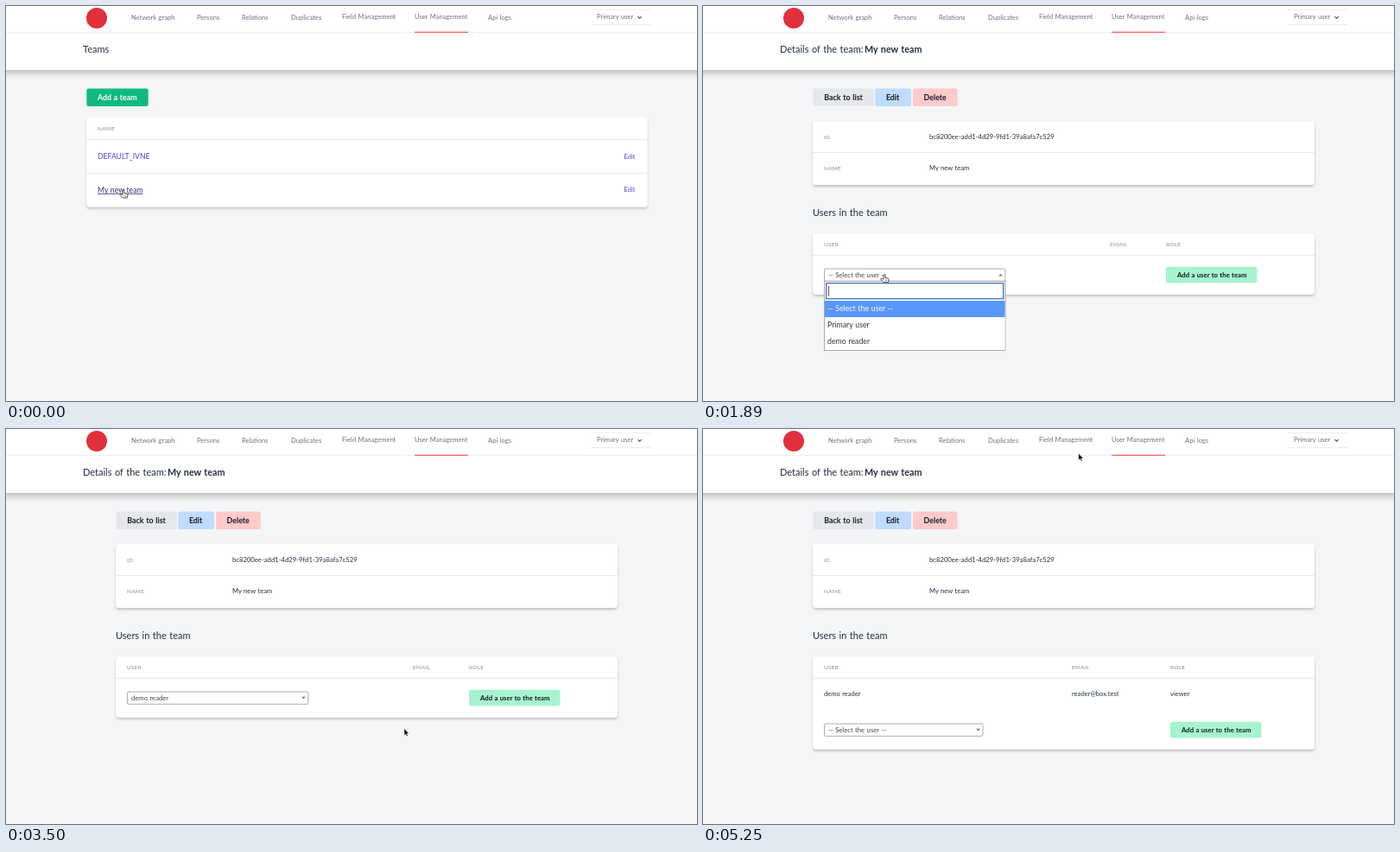
Write an HTML page that moves like this. It is 800x457 px and loops after 5320 ms.

```html
<!DOCTYPE html>
<html lang="en">
<head>
<meta charset="utf-8">
<title>Team management</title>
<style>
  html, body { margin: 0; width: 100%; height: 100%; overflow: hidden; background: #f4f5f7; }
  svg { display: block; width: 100vw; height: 100vh; }
  text { font-family: Lato, "Open Sans", sans-serif; word-spacing: .06em; fill: #252f3f; }
  .nav { font-size: 7.6px; fill: #6b7280; }
  .title { font-size: 11px; }
  .strong { font-size: 10.8px; font-weight: 700; }
  .head { font-size: 6.4px; letter-spacing: .05em; fill: #858b96; }
  .cell { font-size: 7.6px; }
  .code { font-size: 7.7px; }
  .button { font-size: 8.85px; font-weight: 700; fill: #161b26; }
  .small { font-size: 7.75px; font-weight: 700; fill: #101820; }
  .link { font-size: 8.65px; fill: #5145cd; }
  .edit { font-size: 7.6px; fill: #5145cd; }
  .choice { font-size: 7.7px; fill: #444; }
  .option { font-size: 8.75px; fill: #333; }
</style>
</head>
<body>
<svg id="stage" viewBox="0 0 800 457" xmlns="http://www.w3.org/2000/svg">
  <defs>
    <linearGradient id="fade" x2="0" y2="1">
      <stop stop-color="#000" stop-opacity=".2"/>
      <stop offset=".5" stop-color="#000" stop-opacity=".08"/>
      <stop offset="1" stop-color="#000" stop-opacity="0"/>
    </linearGradient>
    <filter id="shadow" x="-5%" y="-10%" width="110%" height="130%">
      <feDropShadow dx="0" dy="2" stdDeviation="1.6" flood-opacity=".22"/>
    </filter>
  </defs>
</svg>
<script>
const LOOP = 5320, STEP = 70;
const OPENED_TEAM = 1050, OPENED_LIST = 1820, PICKED = 2940, ADDED = 4760;
const USER = "Primary user", MEMBER = "demo reader", EMPTY = "-- Select the user --";
const stage = document.getElementById("stage");

const text = (x, y, kind, value, extra = "") =>
  `<text x="${x}" y="${y}" class="${kind}" ${extra}>${value}</text>`;
const rect = (x, y, w, h, fill, extra = "") =>
  `<rect x="${x}" y="${y}" width="${w}" height="${h}" fill="${fill}" ${extra}/>`;
const line = (x, y, w, color = "#e8eaee") => rect(x, y, w, 1, color);
const card = (x, y, w, h) => rect(x, y, w, h, "#fff", 'rx="4" filter="url(#shadow)"');
const button = (x, w, fill, label, extra = "") =>
  rect(x, 95.5, w, 20.5, fill, 'rx="2.5"') + text(x + 12.6, 108.8, "button", label, extra);
const group = (id, content) => `<g id="${id}">${content}</g>`;

function header() {
  const items = [
    [145, 16.3, "Network graph"], [221, 16.3, "Persons"], [273, 16.3, "Relations"],
    [330, 16.3, "Duplicates"], [389, 15.4, "Field Management"],
    [473, 15.4, "User Management"], [558, 16.3, "Api logs"], [684, 15.4, USER]
  ];
  return rect(0, 74, 800, 11, "url(#fade)") + rect(0, 0, 800, 74, "#fff") +
    line(0, 30, 800, "#eceef1") + rect(473, 29.7, 62, 1.4, "#f56565") +
    '<circle cx="105" cy="14" r="12" fill="#e0303c"/>' +
    line(677, 4, 69, "#f0f0f2") + line(677, 21, 69, "#ebebee") +
    items.map(([x, y, label]) => text(x, y, "nav", label)).join("") +
    '<path d="M731.4 12.2l2.2 2 2.2-2" fill="none" stroke="#4b5563" stroke-width="1.1"/>';
}

function teamsPage() {
  return text(89, 54, "title", "Teams") +
    button(93.3, 71.4, "#10b981", "Add a team", 'style="fill:#fff"') +
    card(93.5, 129, 649, 103.5) + line(93.5, 154, 649) + line(93.5, 193, 649) +
    text(106, 144.2, "head", "NAME") +
    text(106, 177, "link", "DEFAULT_IVNE") +
    text(106, 215.8, "link", "My new team", 'style="fill:#362f78" text-decoration="underline"') +
    text(715.5, 176.7, "edit", "Edit") + text(715.5, 215.3, "edit", "Edit");
}

function teamDetails() {
  return text(89, 54, "title", "Details of the team:") + text(187, 54, "strong", "My new team") +
    button(127.7, 70, "#e5e7eb", "Back to list") +
    button(199.3, 41.7, "#bfdbfe", "Edit") +
    button(243, 51.7, "#fecaca", "Delete") +
    card(127.3, 133.3, 580.7, 73.7) + line(127.3, 169, 580.7) +
    text(140, 153.7, "head", "ID") + text(140, 190.2, "head", "NAME") +
    text(262, 154, "code", "bc8200ee-add1-4d29-9fd1-39a8afa7c529") +
    text(262, 190.4, "cell", "My new team") +
    text(127, 243, "title", "Users in the team");
}

function usersCard(name, height, emailX, roleX, formY, selectWidth, row = "") {
  const arrowX = 140 + selectWidth - 5.5;
  return group(name,
    card(127.3, 263.3, 580.7, height) + line(127.3, 288, 580.7) +
    text(140, 277.7, "head", "USER") + text(emailX, 277.7, "head", "EMAIL") +
    text(roleX, 277.7, "head", "ROLE") + row +
    rect(140.5, formY - 7, selectWidth - .5, 14.3, "#fff", 'rx="1.5" stroke="#aaa"') +
    text(145, formY + 2.9, "choice", EMPTY, `id="${name}Choice"`) +
    `<path id="${name}Arrow" transform="translate(${arrowX} ${formY})" d="M-2.3-1.2h4.6L0 1.5z" fill="#777"/>` +
    rect(roleX, formY - 9.3, 105.5, 18.8, "#a7f3d0", `rx="2.5" id="${name}Button"`) +
    text(roleX + 13, formY + 2.7, "small", "Add a user to the team"));
}

function dropdown() {
  return rect(140.5, 318.5, 209.5, 80, "#fff", 'stroke="#aaa"') +
    rect(142.7, 320.7, 205, 18, "#fff", 'stroke="#3f6fc4" stroke-width="1.3"') +
    rect(145.2, 324, .9, 11.5, "#444", 'id="caret"') +
    [EMPTY, USER, MEMBER].map((label, i) =>
      rect(141, 341 + 19 * i, 208.5, 19, "#fff", `id="bar${i}"`) +
      text(144, 353.4 + 19 * i, "option", label, `id="option${i}"`)).join("");
}

const memberRow = text(140, 309.2, "cell", MEMBER) +
  text(427, 309.2, "cell", "reader@box.test") + text(541, 309.2, "cell", "viewer");

const cursors =
  group("arrow", '<path d="M0 0V8l1.8-1.6 1.2 2.7 1.3-.6-1.2-2.6h2.4z" fill="#000" stroke="#fff" stroke-width=".5"/>') +
  group("hand", '<path d="M-1 .8Q0-.5 1 .8V4l3 .6q1.2.4 1 1.6L4.2 9.4h-5L-4 6q-.4-1.4 1-1.2l2 1z" fill="#fff" stroke="#222" stroke-width=".8" stroke-linejoin="round"/>' +
    '<path d="M1 6v2m1.4-2v2" stroke="#222" stroke-width=".5"/>');

stage.insertAdjacentHTML("beforeend",
  rect(0, 0, 800, 457, "#f4f5f7") + header() +
  group("teams", teamsPage()) +
  group("details", teamDetails() +
    usersCard("first", 70.4, 471, 536, 311, 210) +
    usersCard("second", 107.4, 427, 541, 348, 184, memberRow) +
    group("list", dropdown())) +
  group("cursor", cursors));

const part = Object.fromEntries([...stage.querySelectorAll("[id]")].map(node => [node.id, node]));
const show = (id, on) => part[id].setAttribute("display", on ? "inline" : "none");

// Pointer stops: time, x, y
const path = [
  [0, 136, 212.6], [1190, 136, 212.6], [1650, 210, 310.4], [2250, 210, 310.4],
  [2660, 224, 379.6], [2980, 224, 379.6], [3430, 461, 346.5], [3560, 461, 346.5],
  [4060, 577.5, 316], [4830, 577.5, 316], [5250, 434.8, 28.2], [LOOP, 434.8, 28.2]
];
const handTimes = [[0, 840], [1610, 2980], [3920, 4480]];

function pointerAt(t) {
  const i = path.findIndex(([end]) => end > t);
  const [t0, x0, y0] = path[i - 1], [t1, x1, y1] = path[i];
  const u = (t - t0) / (t1 - t0), k = u * u * (3 - 2 * u);
  return [x0 + (x1 - x0) * k, y0 + (y1 - y0) * k];
}

function render(t) {
  const [x, y] = pointerAt(t);
  const open = t >= OPENED_LIST && t < PICKED;
  const hand = handTimes.some(([from, to]) => t >= from && t < to);
  show("teams", t < OPENED_TEAM);
  show("details", t >= OPENED_TEAM);
  show("first", t < ADDED);
  show("second", t >= ADDED);
  show("list", open);
  show("caret", (t - OPENED_LIST) % 1000 < 500);
  show("hand", hand);
  show("arrow", !hand);
  part.cursor.setAttribute("transform", `translate(${x} ${y})`);

  const active = y >= 379 ? 2 : y >= 360 ? 1 : 0;
  for (let i = 0; i < 3; i++) {
    part["bar" + i].setAttribute("fill", i === active ? "#5897fb" : i === 0 ? "#ddd" : "#fff");
    part["option" + i].style.fill = i === active ? "#fff" : "";
  }
  part.firstChoice.textContent = t < PICKED ? EMPTY : MEMBER;
  part.firstArrow.setAttribute("d", open ? "M-2.3 1.5h4.6L0-1.2z" : "M-2.3-1.2h4.6L0 1.5z");
  part.firstButton.setAttribute("fill", t >= 3920 ? "#6ee7b7" : "#a7f3d0");
}

const start = performance.now();
function tick() {
  const t = (performance.now() - start) % LOOP;
  render(Math.floor(t / STEP) * STEP);
  requestAnimationFrame(tick);
}
tick();
</script>
</body>
</html>
```
